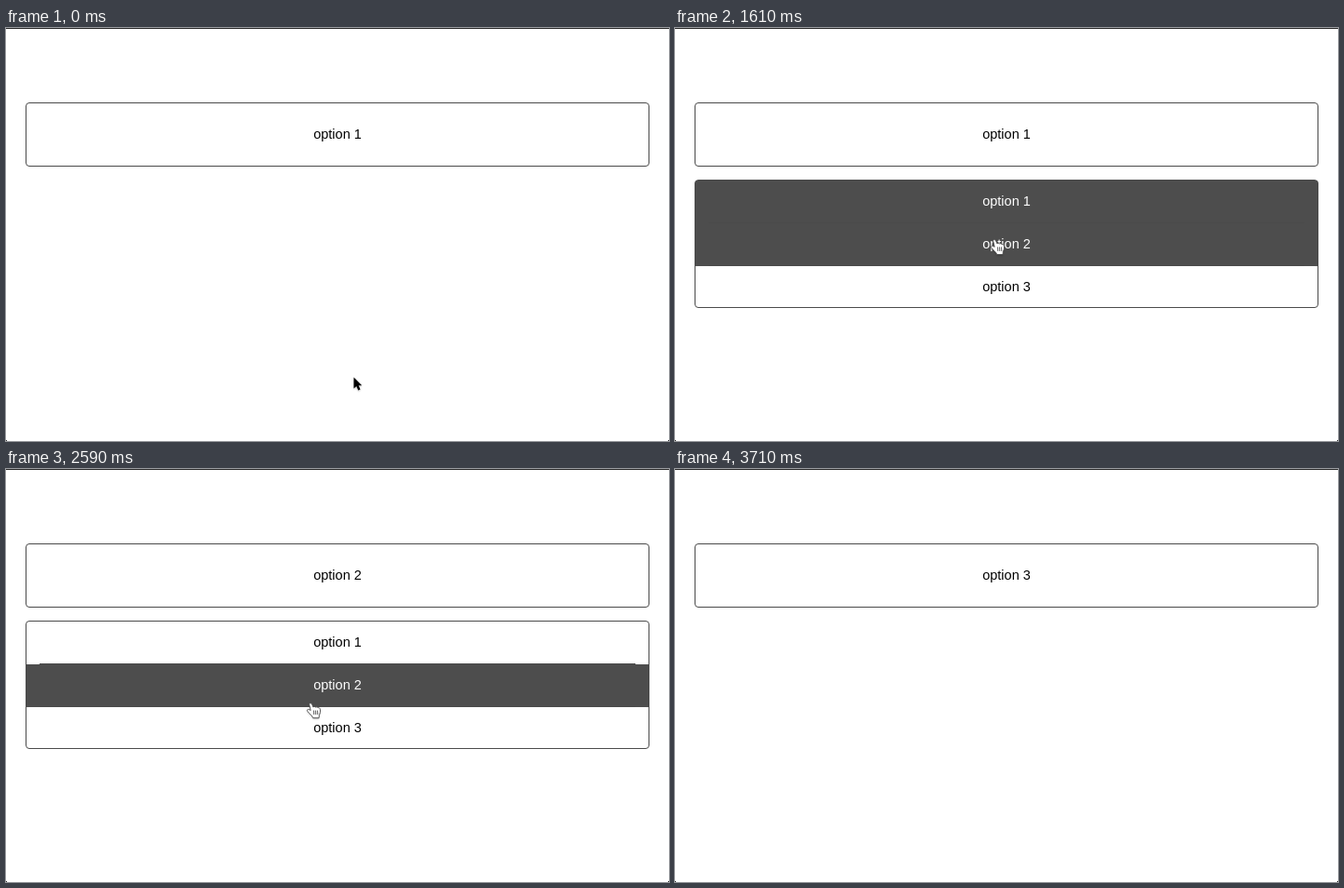
An HTML page with a canvas that plays this animation: 712 by 444 pixels, repeating every 3780 ms.

```html
<!DOCTYPE html>
<html lang="en">
<head>
<meta charset="utf-8">
<title>Dropdown select</title>
<style>
  html, body { margin: 0; width: 100%; height: 100%; overflow: hidden; background: #fff; }
  canvas { display: block; }
</style>
</head>
<body>
<canvas id="stage" width="712" height="444"></canvas>
<script>
const ctx = document.getElementById('stage').getContext('2d');
const LOOP = 3780, STEP = 70, ROW = 46, MENU_TOP = 164;
const INK = '#4a4a4a', FILL = '#4d4d4d';

const smooth = p => p * p * (3 - 2 * p);
const glide = p => 1 - (1 - p) ** 3;

// Pointer moves; it rests in between
const home = { x: 373.5, y: 375.5 };
const moves = [
  { from: 0, to: 70, x: 394, y: 292.5, ease: smooth },
  { from: 350, to: 770, x: 439, y: 134, ease: smooth },
  { from: 910, to: 1680, x: 342.5, y: 228, ease: glide },
  { from: 1820, to: 2100, x: 404, y: 102, ease: smooth },
  { from: 2240, to: 2940, x: 315.5, y: 273.5, ease: glide },
  { from: 3010, to: 3150, x: 263.5, y: 315.5, ease: smooth },
  { from: 3290, to: 3710, x: 340, y: 447, ease: smooth }
];

const arrow = new Path2D('M0 0V12L2.8 9.5 4.8 14 7 13.1 5.1 8.7H8.7Z');
const hand = new Path2D(`M-1 .6C-.4 -.8 1.3 -.5 2 .8L3.4 4
  C4 3 5.5 3.2 6 4.2C6.8 3.4 8 3.7 8.5 4.7C9.4 4.2 10.6 5 10.8 6.2
  C11.2 8.6 10.8 10.6 9.8 12.4L9.5 15.6H3.2C2.4 13 -.4 11.4 -2.6 8.6
  C-3.8 7.2 -2.8 5.8 -1.3 6.4L.6 7.4Z`);
const knuckles = new Path2D();
for (let x = 4; x < 9; x += 2) {
  knuckles.moveTo(x, 7.5);
  knuckles.lineTo(x + .2, 12);
}

function pointerAt(t) {
  let { x, y } = home;
  for (const move of moves) {
    if (t <= move.from) break;
    const p = move.ease(Math.min(1, (t - move.from) / (move.to - move.from)));
    x += (move.x - x) * p;
    y += (move.y - y) * p;
  }
  return { x, y };
}

function label(n, y, color) {
  ctx.fillStyle = color;
  ctx.fillText('option ' + n, 356, y);
}

function frame(y, height) {
  ctx.beginPath();
  ctx.roundRect(21.5, y, 669, height, 3.5);
}

function outline() {
  ctx.strokeStyle = INK;
  ctx.lineWidth = 1;
  ctx.stroke();
}

function drawMenu(selected, mouseY) {
  ctx.save();
  frame(MENU_TOP - .5, 137);
  ctx.clip();
  const hovered = Math.floor((mouseY - MENU_TOP) / ROW) + 1;
  for (let n = 1; n <= 3; n++) {
    const top = MENU_TOP + ROW * (n - 1);
    const dark = n === hovered || n === selected;
    if (dark) {
      ctx.fillStyle = FILL;
      ctx.fillRect(21, top, 670, ROW);
    }
    if (n < 3) {
      ctx.fillStyle = INK;
      ctx.fillRect(36, top + ROW - 1, 640, 1);
    }
    label(n, top + 27, dark ? '#fff' : '#000');
  }
  ctx.restore();
  frame(MENU_TOP - .5, 137);
  outline();
}

function drawPointer(x, y, pressable) {
  const shape = pressable ? hand : arrow;
  ctx.save();
  ctx.translate(x, y);
  ctx.lineJoin = 'round';
  ctx.shadowColor = 'rgba(0,0,0,.3)';
  ctx.shadowBlur = 2;
  ctx.shadowOffsetY = 1;
  ctx.fillStyle = pressable ? '#fff' : '#000';
  ctx.fill(shape);
  ctx.shadowColor = 'transparent';
  if (pressable) {
    ctx.lineWidth = .9;
    ctx.stroke(hand);
    ctx.stroke(knuckles);
  }
  ctx.restore();
}

function draw(t) {
  const open = (t >= 910 && t < 1680) || (t >= 2240 && t < 2940);
  const selected = t < 1680 ? 1 : t < 2940 ? 2 : 3;
  const { x, y } = pointerAt(t);

  ctx.fillStyle = '#fff';
  ctx.fillRect(0, 0, 712, 444);
  ctx.fillStyle = '#2a2a2a';
  ctx.fillRect(0, 0, 712, 1);
  ctx.fillRect(0, 443, 1, 1);
  ctx.fillRect(711, 443, 1, 1);

  ctx.font = '14.5px Helvetica, Arial, "Liberation Sans", sans-serif';
  ctx.textAlign = 'center';
  frame(80.5, 68);
  outline();
  label(selected, 119, '#000');
  if (open) drawMenu(selected, y);

  const overBox = y >= 80 && y < 149;
  const overMenu = open && y >= MENU_TOP && y < 301;
  drawPointer(x, y, overBox || overMenu);
}

function tick() {
  const t = performance.now() % LOOP;
  draw(Math.floor(t / STEP) * STEP);
  requestAnimationFrame(tick);
}
tick();
</script>
</body>
</html>
```
